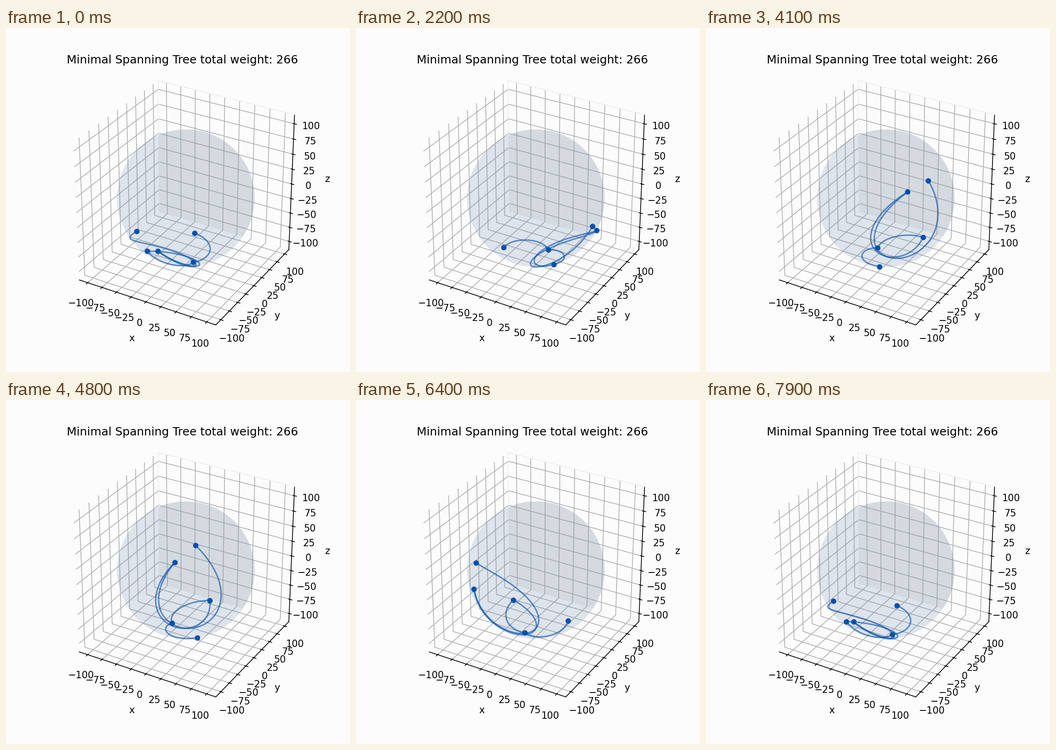
A matplotlib script for the animation above (8 s loop, 748x748 px).

```python
import numpy as np
import matplotlib.pyplot as plt
from matplotlib.animation import FuncAnimation
from matplotlib.patches import Circle
from mpl_toolkits.mplot3d.art3d import Poly3DCollection

SIZE, DPI = 748, 149.6
FRAMES, INTERVAL = 80, 100
RADIUS = 100
LIMIT = 110 * 25 / 24
BLUE = "#0450ad"

# Nodes as (polar angle, azimuth) in degrees; angles may run past half a turn.
NODES = np.array([
    (97.6, 255.5),
    (247.2, 94.5),
    (143.4, 226.7),
    (166.6, 328.0),
    (151.3, 464.5),
])
EDGES = [(0, 1), (1, 2), (2, 3), (3, 4)]


def on_sphere(angles, turn=0.0):
    polar = np.radians(angles[:, 0])
    azimuth = np.radians(angles[:, 1] + turn)
    return RADIUS * np.array([
        np.sin(polar) * np.cos(azimuth),
        np.sin(polar) * np.sin(azimuth),
        np.cos(polar),
    ])


def edge_angles(start, end, steps=100):
    s = np.linspace(0, 1, steps)[:, None]
    return NODES[start] * (1 - s) + NODES[end] * s


def silhouette(elev=30, azim=-60, steps=240):
    """Outline of the sphere as seen by the camera."""
    e, a = np.radians([elev, azim])
    right = np.array([-np.sin(a), np.cos(a), 0])
    up = np.array([-np.sin(e) * np.cos(a), -np.sin(e) * np.sin(a), np.cos(e)])
    u = np.linspace(0, 2 * np.pi, steps, endpoint=False)[:, None]
    return RADIUS * (np.cos(u) * right + np.sin(u) * up)


fig = plt.figure(figsize=(SIZE / DPI, SIZE / DPI), dpi=DPI, facecolor="#fcfcfc")
ax = fig.add_subplot(projection="3d", computed_zorder=False, facecolor="#fcfcfc")
ax.view_init(elev=30, azim=-60)
ax.set_box_aspect((1, 1, 1))
ax.set_xlim(-LIMIT, LIMIT, view_margin=0)
ax.set_ylim(-LIMIT, LIMIT, view_margin=0)
ax.set_zlim(-LIMIT, LIMIT, view_margin=0)
ax.set(xlabel="x", ylabel="y", zlabel="z")
ax.set_title("Minimal Spanning Tree total weight: 266")

# The back wall only shows through the tinted sphere.
for axis in (ax.xaxis, ax.zaxis):
    axis.set_pane_color((1, 1, 1, 0))
ax.yaxis.set_pane_color((241 / 255, 240 / 255, 238 / 255, 1))
ax.yaxis.pane.set_clip_path(Circle((391.1, 378.0), 149.4))
ax.plot([-LIMIT, -LIMIT, LIMIT], [LIMIT] * 3, [-LIMIT, LIMIT, LIMIT],
        color="#ececec", lw=0.7, zorder=1)

ax.add_collection3d(Poly3DCollection(
    [silhouette()], facecolor=(94 / 255, 126 / 255, 168 / 255, 0.19),
    edgecolor="none", zorder=2))

curves = [edge_angles(*edge) for edge in EDGES]
lines = [ax.plot([], [], [], color=BLUE, alpha=0.62, lw=1.5, zorder=3)[0]
         for _ in EDGES]
dots, = ax.plot([], [], [], "o", color=BLUE, ms=5.7, mew=0, zorder=4)


def update(frame):
    turn = 360 * frame / FRAMES
    for line, curve in zip(lines, curves):
        line.set_data_3d(*on_sphere(curve, turn))
    dots.set_data_3d(*on_sphere(NODES, turn))
    return [*lines, dots]


anim = FuncAnimation(fig, update, frames=FRAMES, interval=INTERVAL,
                     repeat=True, repeat_delay=0)
plt.show()
```
